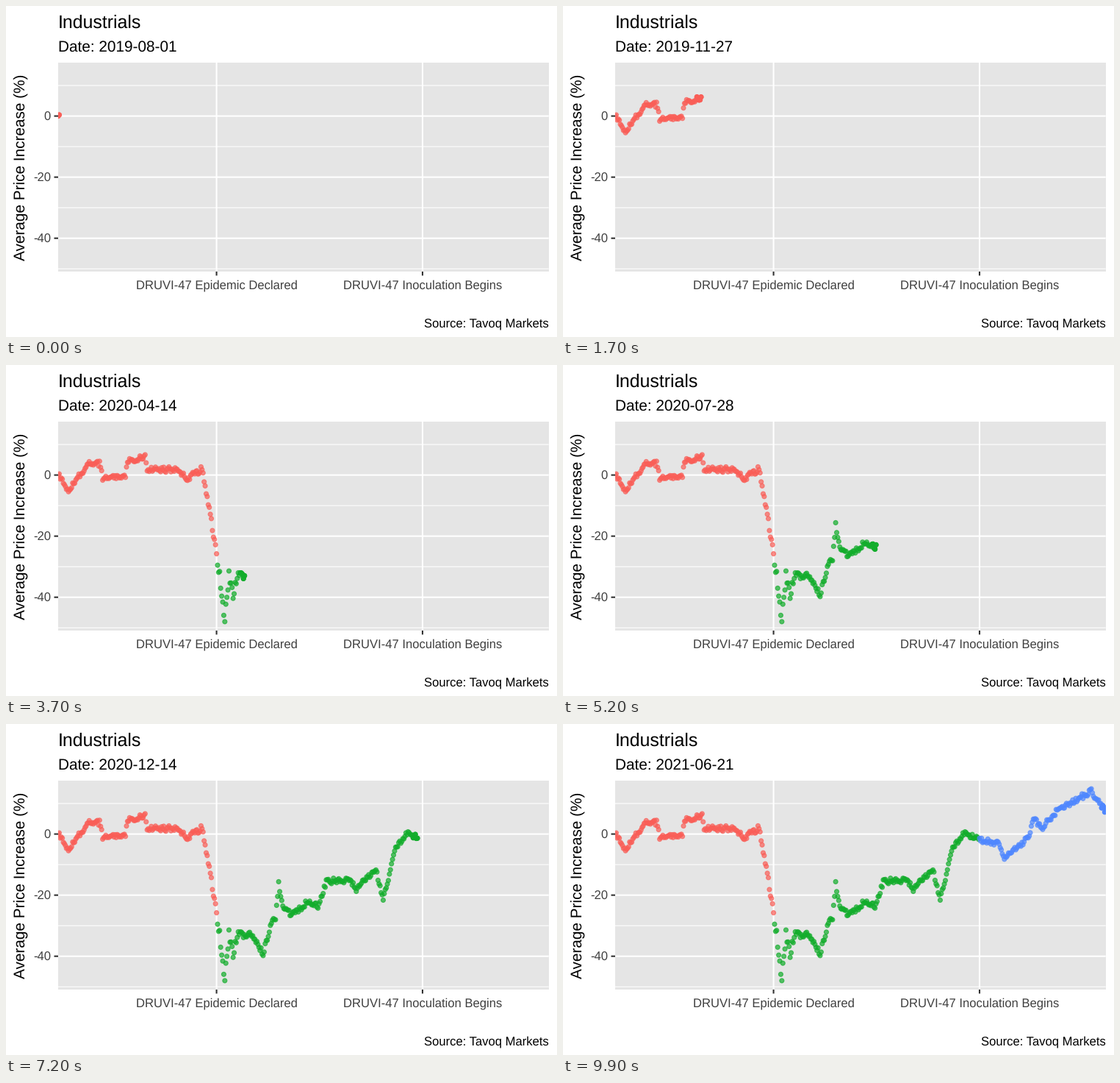
A matplotlib script that plays this animation: 750 by 450 pixels, repeating every 10000 ms.

```python
import numpy as np
import matplotlib.pyplot as plt
from matplotlib.animation import FuncAnimation
from matplotlib.patches import Rectangle

plt.rcParams["font.family"] = "Liberation Sans"
plt.rcParams["text.hinting"] = "none"

W, H, DPI = 750, 450, 100
FRAMES, INTERVAL = 100, 100
LEFT, RIGHT, TOP, BOTTOM = 71, 738.7, 77, 361
PX = 72 / DPI
BASE = 20.75
N_DAYS, DECLARED, TREATED = 475, 153, 352
START, SPAN = np.datetime64("2019-08-01"), 690


def to_x(day):
    return LEFT + 1.409 * day


def to_y(percent):
    return 149.6 - 4.153 * percent


# Turning points of the price: trading day, percent.
turns = [(0, 0), (10, -5), (30, 4.2), (40, 3.7), (43, -1), (65, 0),
         (67, 4.5), (84, 5.8), (86, 1.8), (113, 1.8), (125, -1), (139, 2),
         (DECLARED, -25.5), (161, -47), (165, -33), (169, -39), (173, -33),
         (186, -33), (198, -39), (206, -29), (210, -28), (213, -16),
         (217, -24), (226, -26.5), (240, -22.5), (252, -23.5), (259, -15.5),
         (282, -15), (288, -18), (307, -11.5), (314, -21.5), (326, -4.5),
         (338, 0.5), (TREATED, -1.8), (370, -3), (376, -8), (398, -1.7),
         (405, 5), (412, 2), (428, 8), (444, 11), (460, 14), (474, 7)]

day = np.arange(N_DAYS)
rng = np.random.default_rng(8)
volatility = 0.9 + 1.2 * np.exp(-((day - 160) / 14) ** 2)
noise = volatility * rng.uniform(-1, 1, N_DAYS)
noise[0] = 0
price = np.maximum(np.interp(day, *zip(*turns)) + noise, -48)
points = np.column_stack([to_x(day), to_y(price)])

palette = np.array([[0.98, 0.37, 0.34, 0.7],
                    [0.07, 0.68, 0.17, 0.7],
                    [0.31, 0.53, 1.00, 0.7]])
colors = palette[(day > DECLARED).astype(int) + (day >= TREATED)]

fig = plt.figure(figsize=(W / DPI, H / DPI), dpi=DPI, facecolor="white")
ax = fig.add_axes([0, 0, 1, 1])
ax.set(xlim=(0, W), ylim=(H, 0))
ax.axis("off")


def line(x, y, color="white", width=2.1, z=2):
    ax.plot(x, y, color=color, lw=width * PX, zorder=z,
            solid_capstyle="butt", snap=False)


def label(x, y, text, size=0.8, color="black", ha="left"):
    return ax.text(x, y, text, fontsize=BASE * size * PX, color=color,
                   ha=ha, va="baseline")


panel = Rectangle((LEFT, TOP), RIGHT - LEFT, BOTTOM - TOP,
                  fc="#e5e5e5", ec="none", zorder=0)
ax.add_patch(panel)

for percent in range(-50, 11, 20):
    y = to_y(percent)
    line([LEFT, RIGHT], [y, y], width=1.1, z=1)
for percent in range(-40, 1, 20):
    y = to_y(percent)
    line([LEFT, RIGHT], [y, y])
    line([65.5, LEFT], [y, y], "#333333")
    label(61, y + 5.9, str(percent), color="#404040", ha="right")
for event, text in ((DECLARED, "DRUVI-47 Epidemic Declared"),
                    (TREATED, "DRUVI-47 Inoculation Begins")):
    x = to_x(event)
    line([x, x], [TOP, BOTTOM])
    line([x, x], [BOTTOM, 366.5], "#333333")
    label(x, 384.3, text, color="#404040", ha="center")

label(LEFT, 30, "Industrials", 1.2)
subtitle = label(LEFT, 61.3, "", 1)
label(738.3, 436.3, "Source: Tavoq Markets", ha="right")
ax.text(30.5, 219, "Average Price Increase (%)", rotation=90,
        fontsize=BASE * PX, ha="right", va="center")

dots = ax.scatter([], [], s=(6 * PX) ** 2, lw=1.1 * PX, zorder=3)
dots.set_clip_path(panel)


def update(frame):
    t = frame / (FRAMES - 1)
    head = 1 + (N_DAYS - 1) * t + 2.6 * np.sin(np.pi * t)
    n = min(int(head) + 1, N_DAYS)
    # The newest points overlap themselves and look solid.
    tip = np.arange(max(0, n - 5), n)
    order = np.concatenate([np.arange(n), tip, tip])
    dots.set_offsets(points[order])
    dots.set_facecolor(colors[order])
    dots.set_edgecolor(colors[order])
    subtitle.set_text(f"Date: {START + frame * SPAN // (FRAMES - 1)}")
    return dots, subtitle


anim = FuncAnimation(fig, update, frames=FRAMES, interval=INTERVAL,
                     repeat=True, repeat_delay=0)
plt.show()
```
